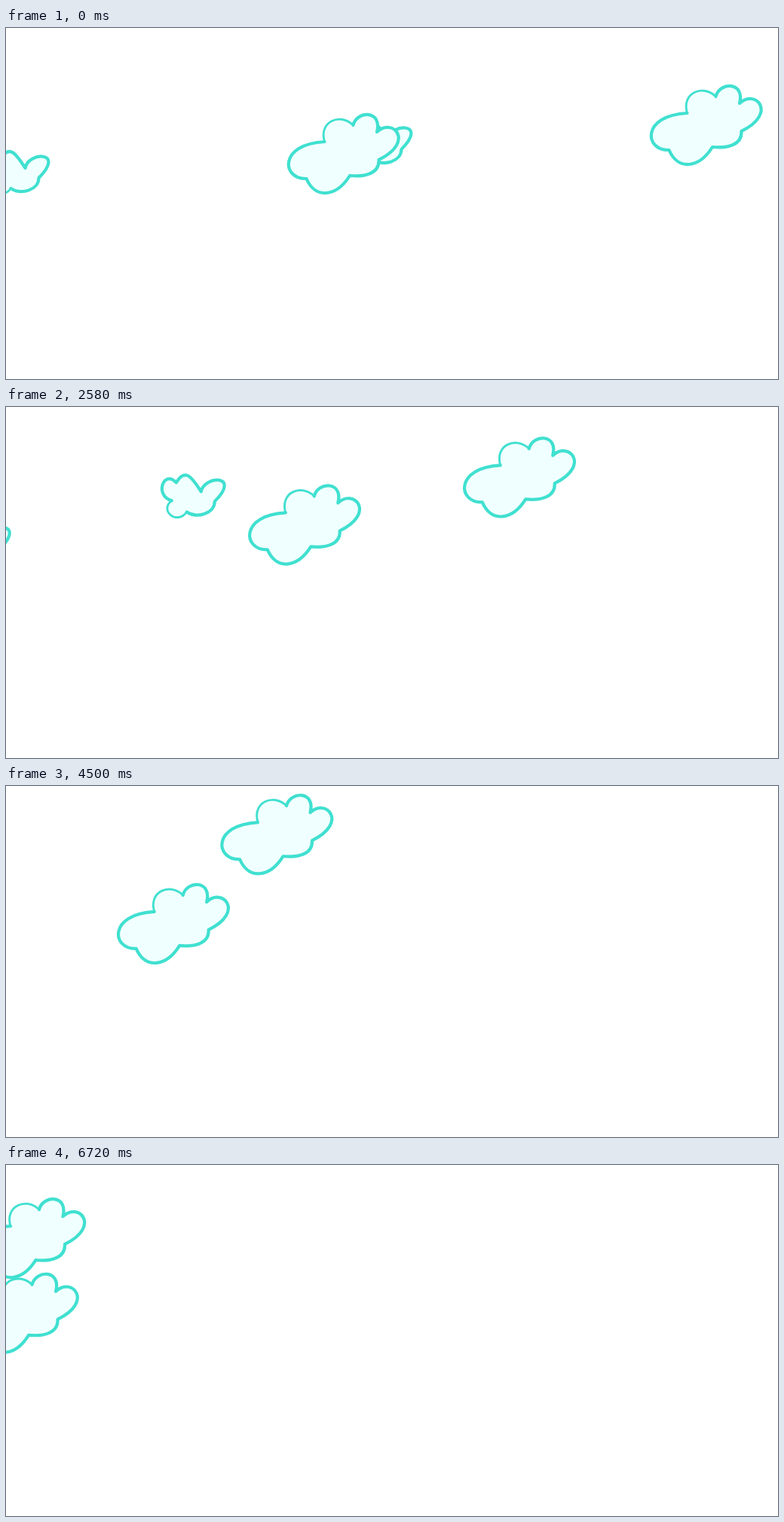
These frames come from a looping animation (1024x466 px, 6.78 s). An HTML page:

```html
<!DOCTYPE html>
<html lang="en">
<head>
<meta charset="utf-8">
<title>Drifting clouds</title>
<style>
  html, body { margin: 0; width: 100%; height: 100%; overflow: hidden; background: #fff; }
  svg { display: block; width: 100%; height: 100%; }
  path { fill: none; stroke: #40e0d0; stroke-linecap: round; stroke-linejoin: round; }
  .body { fill: #f0ffff; stroke: none; }
  .bold { stroke-width: 4.2; }
  .fine { stroke-width: 2.9; }
</style>
</head>
<body>
<svg viewBox="0 0 1024 466">
  <defs>
    <!-- One curve per lobe; the last lobe of each cloud has a finer line. -->
    <g id="pair">
      <g transform="translate(-607.5 -40)">
        <path class="body" d="M220 125C196 118 210 83 226 101C238 81 247 94 259 113C263 91 313 90 277 126C277 142 254 149 240 140C227 158 203 138 220 125"/>
        <path class="fine" d="M240 140C227 158 203 138 220 125"/>
        <path class="bold" d="M220 125C196 118 210 83 226 101C238 81 247 94 259 113C263 91 313 90 277 126C277 142 254 149 240 140"/>
      </g>
      <g transform="translate(-855.5 -75)">
        <path class="body" d="M942 91C947 71 981 71 973.5 100C994 80 1025 113 976 137C977 155 958 160 937.5 158C920 186 892 190 880 162C847 163 843 116 904 113C896 86 925 74 942 91"/>
        <path class="fine" d="M904 113C896 86 925 74 942 91"/>
        <path class="bold" d="M942 91C947 71 981 71 973.5 100C994 80 1025 113 976 137C977 155 958 160 937.5 158C920 186 892 190 880 162C847 163 843 116 904 113"/>
      </g>
    </g>
  </defs>
  <use id="upper" href="#pair"/>
  <use id="lower" href="#pair"/>
</svg>
<script>
  const LOOP = 6780, STEP = 60, SPAN = 720;

  // Waypoints of the large cloud's top left corner, one per SPAN.
  const routes = {
    upper: {
      x: [855, 825, 790, 685, 550, 422, 314, 200, 102, 1, -138],
      y: [75, 74, 54, 43, 37, 29, 10, 19, 28, 40, 49]
    },
    lower: {
      x: [374, 361, 354, 339, 305, 240, 168, 88, 23, -33, -90],
      y: [113, 114, 108, 104, 103, 114, 125, 141, 146, 144, 140]
    }
  };

  // Catmull-Rom curve through evenly spaced values.
  function glide(v, pos) {
    const i = Math.floor(pos), u = pos - i;
    const b = v[i], c = v[i + 1];
    const a = v[i - 1] ?? 2 * b - c, d = v[i + 2] ?? 2 * c - b;
    return b + u / 2 * (c - a + u * (2 * a - 5 * b + 4 * c - d + u * (3 * (b - c) + d - a)));
  }

  const begin = performance.now();

  function draw() {
    const t = Math.floor((performance.now() - begin) % LOOP / STEP) * STEP;
    for (const [id, { x, y }] of Object.entries(routes)) {
      const place = `translate(${glide(x, t / SPAN)} ${glide(y, t / SPAN)})`;
      document.getElementById(id).setAttribute('transform', place);
    }
    requestAnimationFrame(draw);
  }
  draw();
</script>
</body>
</html>
```
